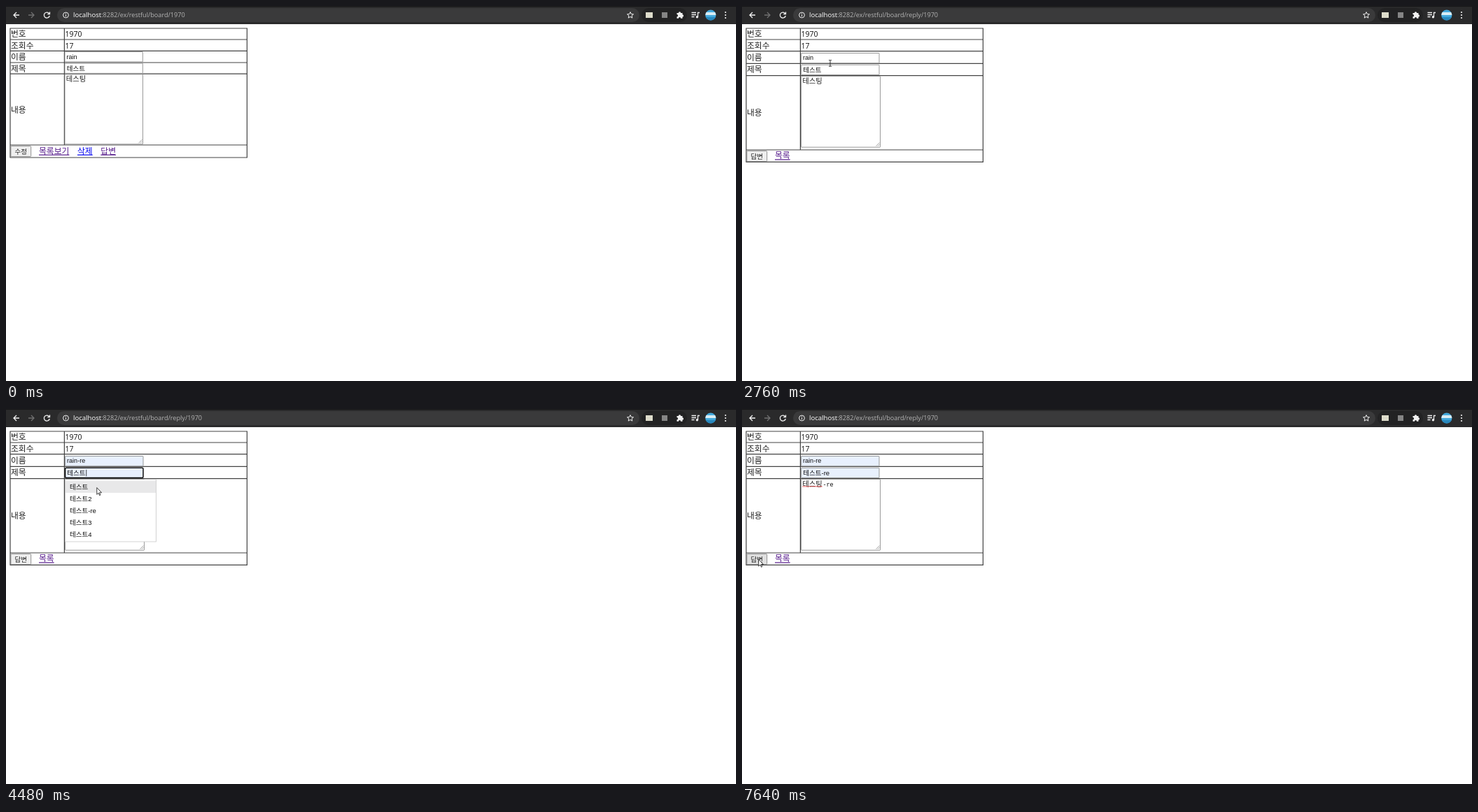
Animation, 1043 px wide and 537 px high, one loop 8000 ms. Source, as an HTML page:

```html
<!DOCTYPE html>
<html lang="ko">
<head>
<meta charset="utf-8">
<title>Board reply</title>
<style>
html, body { margin: 0; width: 100%; height: 100%; overflow: hidden; background: #fff; }
svg { display: block; width: 100%; height: 100%; }
text { white-space: pre; }
.ko { font: 11.8px "Noto Sans CJK KR", "Noto Sans CJK", sans-serif; fill: #222; }
.num { font: 10.5px "Open Sans", sans-serif; fill: #111; }
.ui { font-family: "Open Sans", sans-serif; }
.field { font: 9.1px "Liberation Sans", "Noto Sans CJK KR", "Noto Sans CJK", sans-serif; fill: #111; }
.wide { font-size: 9.5px; }
.area { font: 10.3px "Noto Sans CJK KR", "Noto Sans CJK", monospace; fill: #222; }
.mono { font: 8.5px "Liberation Mono", monospace; fill: #111; }
.link { text-decoration: underline; }
.icon { fill: none; stroke: #f1f1f1; stroke-width: 1.3; }
</style>
</head>
<body>
<svg viewBox="0 0 1043 537">
  <rect width="1043" height="26" fill="#2a2a2b"/>
  <rect width="1043" height="1" fill="#161617"/>
  <rect x="73" y="3" width="832" height="20" rx="10" fill="#3a3a3b"/>
  <rect x="908" y="3" width="65" height="20" rx="10" fill="#222223"/>
  <path class="icon" d="M19 13h-8m4-4-4 4 4 4"/>
  <path class="icon" style="stroke:#707070" d="M32 13h8m-4-4 4 4-4 4"/>
  <circle class="icon" cx="85.5" cy="13" r="3.9" style="stroke-width:1"/>
  <path class="icon" d="M85.5 12.4v2.8m0-4.8v1.1" style="stroke-width:1"/>
  <path class="icon" style="stroke-width:1" d="M892 8.6l1.3 2.9 3.2.3-2.4 2.1.7 3.2-2.8-1.7-2.8 1.7.7-3.2-2.4-2.1 3.2-.3z"/>
  <rect x="914" y="9" width="10" height="8" fill="#dddccb"/>
  <rect x="937" y="9" width="8" height="8" fill="#858585"/>
  <path fill="#f1f1f1" d="M958.5 10h2.3a1.7 1.7 0 0 1 3.4 0h2.3v2.3a1.6 1.6 0 0 1 0 3.2v2.2h-2.4a1.6 1.6 0 0 0-3.2 0h-2.4v-2.4a1.6 1.6 0 0 0 0-3.2z"/>
  <path class="icon" d="M979.5 9.5h6.5m-6.5 3h6.5m-6.5 3h4m5 .5V9.5h2.5"/>
  <circle cx="987.4" cy="15.7" r="1.7" fill="#f1f1f1"/>
  <clipPath id="round"><circle cx="1006.8" cy="13" r="7.6"/></clipPath>
  <g clip-path="url(#round)">
    <rect x="999" y="5" width="16" height="16" fill="#43a9dc"/>
    <rect x="999" y="9" width="16" height="4" fill="#d8edf5"/>
    <rect x="999" y="16" width="16" height="5" fill="#2787bd"/>
  </g>
  <g fill="#f1f1f1"><circle cx="1028" cy="9" r="1.1"/><circle cx="1028" cy="13" r="1.1"/><circle cx="1028" cy="17" r="1.1"/></g>
  <g id="scene"></g>
</svg>
<script>
const LOOP = 8000, STEP = 108.6, ROW = 17;
const scene = document.getElementById('scene');

const views = {
  read: { lines: [32, 48, 64.4, 81, 97.2, 199, 217], inputs: [65.6, 82], inputH: 14.4, area: [84, 97.8, 111.5, 100],
          button: '수정', links: [['목록보기', 47, '#551a8b'], ['삭제', 102, '#0000ee'], ['답변', 135.3, '#551a8b']] },
  reply: { lines: [32, 48, 64.6, 82.3, 99.6, 206, 223.4], inputs: [67.5, 84.3], inputH: 14.3, area: [84.5, 100.5, 113, 101.7],
           button: '답변', links: [['목록', 47, '#551a8b']] }
};
const labels = ['번호', '조회수', '이름', '제목', '내용'];
const names = ['rain', 'rain-re', 'rain1', 'rain2', 'rain3', 'rain-a', 'rain-b'];
const titles = ['테스트', '테스트2', '테스트-re', '테스트3', '테스트4'];

// Pointer moves: start time, number of steps, way points
const moves = [
  [310, 8, [[560, 105], [340, 230], [145, 204]]],
  [2110, 6, [[145, 204], [126, 82]]],
  [2870, 1, [[126, 82], [126, 76]]],
  [2980, 5, [[126, 76], [126, 94], [126, 111], [126, 128], [126, 111]]],
  [3820, 2, [[126, 111], [124, 92]]],
  [4370, 5, [[124, 92], [138.5, 143.5]]],
  [5140, 4, [[138.5, 143.5], [137, 134]]],
  [6770, 7, [[137, 134], [100, 278], [31, 225]]],
  [7530, 1, [[31, 225], [27, 219]]],
  [7640, 1, [[27, 219], [23.7, 215.3]]]
];

const clamp = v => Math.max(0, Math.min(1, v));
const text = (s, x, y, cls, more = '') => `<text x="${x}" y="${y}" class="${cls}" ${more}>${s}</text>`;
const rect = (x, y, w, h, fill, more = '') =>
  `<rect x="${x}" y="${y}" width="${w}" height="${h}" fill="${fill}" ${more}/>`;
const path = (d, color = '#444', width = 1, more = '') =>
  `<path d="${d}" fill="none" stroke="${color}" stroke-width="${width}" ${more}/>`;
const caret = (x, y) => rect(x, y, 0.8, 9.5, '#111');

function pointerAt(t) {
  const move = moves.filter(m => m[0] <= t).pop();
  if (!move) return null;
  const [start, n, points] = move;
  const u = Math.min(1, (Math.floor((t - start) / STEP) + 1) / n) * (points.length - 1);
  const i = Math.min(points.length - 2, Math.floor(u)), f = u - i;
  return points[i].map((v, k) => v + (points[i + 1][k] - v) * f);
}

function pointer(p, kind) {
  const shapes = {
    arrow: '<path d="M0 0V9.8L2.3 7.7 3.8 11.1 5.2 10.5 3.7 7.2H6.8Z" fill="#fff" stroke="#111" stroke-width=".8"/>',
    hand: '<path d="M-.9 7V1Q0-.5 .9 1V4.6L4.2 5.4Q5.5 5.8 5.2 7.4L4.3 12.4H-.2L-3.2 8.2Q-3-.0 -0.9 8.3ZM2 5V7M3.6 5.4V7.2" fill="#fff" stroke="#111" stroke-width=".8"/>'
      .replace('Q-3-.0 -0.9 8.3', 'Q-2.8 6.6-.9 8.2'),
    beam: path('M-2-4.4H-.5L0-4 .5-4.4H2M0-4V4M-2 4.4H-.5L0 4 .5 4.4H2', '#222', 0.9)
  };
  return `<g transform="translate(${p[0]} ${p[1]})">${shapes[kind]}</g>`;
}

function toolbar(t, reply) {
  const loading = t >= 1670 && t < 1890;
  const icon = loading ? 'M54.8 9.3l7.4 7.4m0-7.4-7.4 7.4' : 'M61.7 10.8A4 4 0 1 0 62.3 14M62.5 8.5v3.2h-3.2';
  return path(icon, '#f1f1f1', 1.3) +
    `<text x="96" y="16.4" class="ui" font-size="9.1" fill="#b4b4b4"><tspan font-size="9.6" fill="#fff">localhost</tspan>:8282/ex/restful/board/${reply ? 'reply/' : ''}1970</text>`;
}

function table(v, hover) {
  const [top, ...rest] = v.lines, bottom = rest[5], split = rest[4];
  let out = path(v.lines.map(y => `M5.5 ${y}H345`).join('') + `M6 ${top}V${bottom}M344.4 ${top}V${bottom}M83.4 ${top}V${split}`, '#444', 1.2);
  labels.forEach((s, i) => out += text(s, 7, (v.lines[i] + v.lines[i + 1]) / 2 + 4.4, 'ko'));
  out += text('1970', 84.4, 44.4, 'num') + text('17', 84.4, 60.6, 'num');
  const base = (split + bottom) / 2 + 3.7;
  out += rect(6.9, split + 1.6, 28.8, 15, hover ? '#e0e0e0' : '#efefef', 'stroke="#767676" stroke-width=".8" rx="1"');
  out += text(v.button, 21.2, base + 0.2, 'ko', 'text-anchor="middle" style="font-size:9.5px"');
  for (const [s, x, color] of v.links) out += text(s, x, base, 'ko link', `style="fill:${color}"`);
  return out;
}

function box(x, y, w, h, focused, filled) {
  return rect(x, y, w, h, filled ? '#e8f0fe' : '#fff',
    focused ? 'stroke="#101010" stroke-width="1.5" rx="1.5"' : 'stroke="#808080" stroke-width=".8" rx=".5"');
}

function dropdown(top, items, row, cls) {
  let out = rect(84.5, top - 2, 130, items.length * ROW + 4, '#fff', 'stroke="#c8c8c8" stroke-width=".8"');
  if (row >= 0) out += rect(85, top, 129, ROW, '#e8e8e9');
  items.forEach((s, i) => out += text(s, 91, top + i * ROW + 11.8, cls));
  return out;
}

function draw(t) {
  const reply = t >= 1780, v = reply ? views.reply : views.read;
  const p = pointerAt(t);
  const menu = t >= 2870 && t < 3710 ? { top: 86, items: names, cls: 'field' }
    : t >= 4150 && t < 5030 ? { top: 103, items: titles, cls: 'field wide' } : null;
  const row = menu ? Math.floor((p[1] - menu.top) / ROW) : -1;
  const preview = row >= 0 ? menu.items[row] : null;
  const onName = t >= 2870 && t < 4150, onTitle = t >= 4150 && t < 5360, onArea = t >= 5360 && t < 7200;

  let out = toolbar(t, reply) + table(v, t >= 7530);

  const name = t >= 3710 ? 'rain-re' : t < 3710 && onName && preview || 'rain';
  const title = t >= 5030 ? '테스트-re' : onTitle && preview || '테스트';
  const [y1, y2] = v.inputs, x = reply ? 84.6 : 84, h = v.inputH;
  out += box(x, y1, 111.4, h, onName, t >= 3710 || onName && preview) + text(name, x + 2.4, y1 + 9.9, 'field');
  out += box(x, y2, 111.4, h, onTitle, t >= 5030 || onTitle && preview) + text(title, x + 2.7, y2 + 10.5, 'field wide');
  if (onName) out += caret(t >= 3710 ? 112.6 : 102.5, y1 + 2.3);
  if (onTitle) out += caret(t >= 5030 ? 125 : 114.4, y2 + 2.5);

  const [ax, ay, aw, ah] = v.area, typed = Math.max(0, [6240, 6350, 6450].filter(k => t >= k).length);
  out += box(ax, ay, aw, ah, onArea);
  out += path(`M${ax + aw - 6} ${ay + ah - 1.5}l5-5m-2.5 5 2.5-2.5`, '#777', 0.7);
  out += text('테스팅', ax + 1.7, ay + 10.4, 'area') + text('-re'.slice(0, typed), 115.4, ay + 10, 'mono');
  if (t >= 6660) out += path('M86.5 111H115', '#e33', 1.1, 'stroke-dasharray="2 .6"');
  if (onArea && (t < 5800 || t >= 6240)) out += caret(115.2 + typed * 5.1, ay + 2.3);

  if (menu) out += dropdown(menu.top, menu.items, row, menu.cls);

  const shown = Math.min(clamp((t - 1040) / 310), clamp((2330 - t) / 220));
  if (t >= 1140 && shown > 0)
    out += `<g opacity="${shown.toFixed(2)}"><path d="M0 522H164Q167 522 167 525V537H0Z"/>` +
      text('localhost:8282/ex/restful/board/reply/1970', 3, 532.5, 'ui', 'font-size="7.87" fill="#fff"') + '</g>';

  if (p) {
    const editable = reply && p[0] > 84 && p[0] < 198 && p[1] > 66 && p[1] < 203;
    const kind = t >= 1140 && t < 2110 ? 'hand' : editable && row < 0 ? 'beam' : 'arrow';
    out += pointer(p, kind);
  }
  return out;
}

let last = '';
function frame() {
  const markup = draw(performance.now() % LOOP);
  if (markup !== last) scene.innerHTML = last = markup;
  requestAnimationFrame(frame);
}
frame();
</script>
</body>
</html>
```
